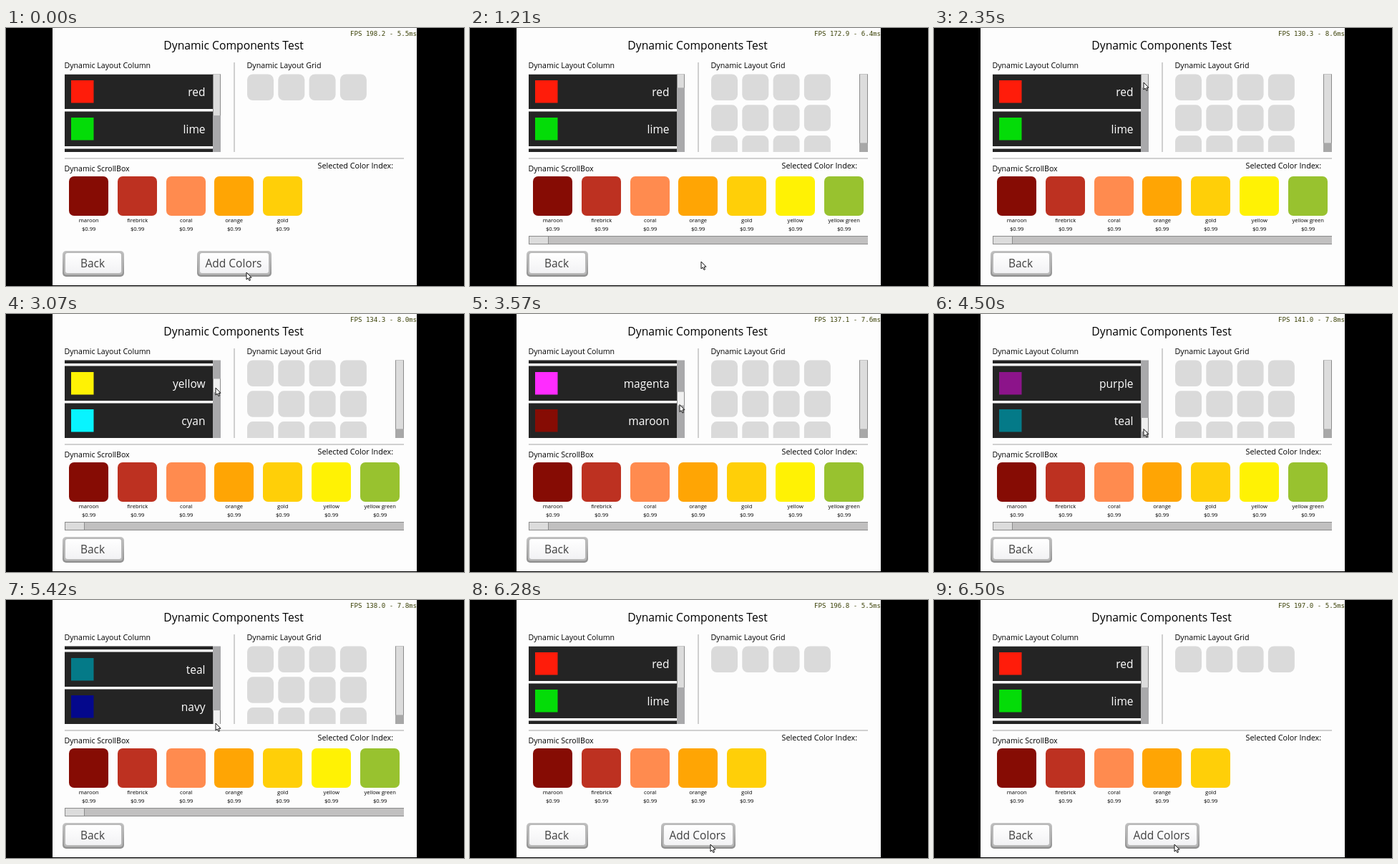
Animation of 640 by 360 pixels, one loop 6570 ms. Source, as an HTML page with a canvas:

```html
<!DOCTYPE html>
<html lang="en">
<head>
<meta charset="utf-8">
<title>Dynamic Components Test</title>
<style>
  html, body { margin: 0; width: 100%; height: 100%; overflow: hidden; background: #000; }
  canvas { display: block; width: 640px; height: 360px; }
</style>
</head>
<body>
<canvas id="stage" width="640" height="360"></canvas>
<script>
const ctx = document.getElementById('stage').getContext('2d');

const LOOP = 6570, ADD_AT = 860, RESET_AT = 6000;
const GRAB_Y = 81;                      // pointer height at which the drag begins
const VIEW = { top: 64.5, height: 108.5 };
const ROW = { pitch: 52, height: 48.5 };

const columnColors = [
  ['red', '#ff1c0a'], ['lime', '#04dc08'], ['blue', '#0818ff'], ['yellow', '#fff204'],
  ['cyan', '#08f4ff'], ['magenta', '#ff2cff'], ['maroon', '#860c04'], ['olive', '#868204'],
  ['green', '#048208'], ['purple', '#8c148a'], ['teal', '#047a88'], ['navy', '#04088c']
];
const boxColors = [
  ['maroon', '#860c04'], ['firebrick', '#bd3121'], ['coral', '#ff8b4f'], ['orange', '#ffa504'],
  ['gold', '#ffcf08'], ['yellow', '#fff204'], ['yellow green', '#98c22f']
];

// time, pointer x, pointer y
const pointerPath = [
  [0, 336, 341], [150, 336, 341], [600, 323, 326], [1480, 323, 326], [2050, 293, 74],
  [2350, 293, 76], [2600, 293, 81], [3570, 293, 126.5], [4500, 293, 160.5],
  [5100, 293, 172], [RESET_AT, 293, 172], [RESET_AT, 336, 341], [LOOP, 336, 341]
];
// time, frames per second, milliseconds
const speedPath = [
  [0, 198.2, 5.5], [ADD_AT, 196, 5.6], [1210, 172.9, 6.4], [2350, 130.3, 8.6],
  [3570, 137.1, 7.6], [4500, 141, 7.8], [5420, 138, 7.8], [RESET_AT, 139, 7.8],
  [RESET_AT, 196.5, 5.5], [6500, 197, 5.5], [LOOP, 197, 5.5]
];

function along(path, time) {
  const next = Math.max(1, path.findIndex(key => key[0] > time));
  const a = path[next - 1], b = path[next];
  const p = (time - a[0]) / (b[0] - a[0]);
  return [1, 2].map(i => a[i] + (b[i] - a[i]) * p);
}

function rect(x, y, w, h, fill) {
  ctx.fillStyle = fill;
  ctx.fillRect(x, y, w, h);
}

function rounded(x, y, w, h, r, fill) {
  ctx.fillStyle = fill;
  ctx.beginPath();
  ctx.roundRect(x, y, w, h, r);
  ctx.fill();
}

function text(str, x, y, size, align = 'left', fill = '#000', family = '"Open Sans", sans-serif') {
  ctx.font = `${size}px ${family}`;
  ctx.textAlign = align;
  ctx.fillStyle = fill;
  ctx.fillText(str, x, y);
}

function vertical(y, h, from, to) {
  const g = ctx.createLinearGradient(0, y, 0, y + h);
  g.addColorStop(0, from);
  g.addColorStop(1, to);
  return g;
}

function clipped(x, y, w, h, draw) {
  ctx.save();
  ctx.beginPath();
  ctx.rect(x, y, w, h);
  ctx.clip();
  draw();
  ctx.restore();
}

function thumb(x, y, w, h, fill = '#dcdcdc') {
  rect(x, y, w, h, '#8c8c8c');
  rect(x + 1, y, w - 2, h, fill);
}

function button(label, x, w) {
  rounded(x, 311, w, 36, 5, vertical(311, 36, '#c4c4c4', '#909090'));
  rounded(x + 2, 312.5, w - 4, 32, 4, '#b8b8b8');
  rounded(x + 4, 314, w - 8, 28, 3, vertical(314, 28, '#ffffff', '#f2f2f4'));
  text(label, x + w / 2 - 1, 334.3, 15.5, 'center', '#404040');
}

function column(count, pointerY, dragging) {
  const content = (count - 1) * ROW.pitch + ROW.height;
  const maxScroll = content - VIEW.height;
  const thumbHeight = VIEW.height ** 2 / content;
  const travel = VIEW.height - thumbHeight;
  const drag = dragging ? Math.max(0, Math.min(travel, pointerY - GRAB_Y)) : 0;

  // The list moves in whole rows, so that the lowest row shown is never cut.
  const rowsLeft = Math.round((1 - drag / travel) * maxScroll / ROW.pitch);
  const scroll = Math.max(0, maxScroll - rowsLeft * ROW.pitch);

  clipped(82, VIEW.top, 207, VIEW.height, () => {
    columnColors.slice(0, count).forEach(([name, color], i) => {
      const y = VIEW.top + i * ROW.pitch - (drag ? scroll : 0);
      rect(82, y, 207, ROW.height, '#242424');
      rect(91, y + 8.5, 31.5, 31.5, color);
      text(name, 278.5, y + 30, 15.5, 'right', '#fff');
    });
  });
  const offset = drag ? scroll / maxScroll * travel : 0;
  rect(289, VIEW.top, 11, VIEW.height, '#a9a9ab');
  thumb(289, VIEW.top + offset, 11, thumbHeight, dragging ? '#f0f0f0' : '#dcdcdc');
}

function grid(count, scrollable) {
  clipped(336, 64, 170, 109, () => {
    for (let i = 0; i < count; i++) {
      rounded(337 + i % 4 * 43.3, 64.5 + Math.floor(i / 4) * 42.8, 37, 36.5, 8, '#dadada');
    }
  });
  if (scrollable) {
    rect(544, VIEW.top, 12, VIEW.height, '#a8a8a8');
    thumb(544, VIEW.top, 12, 96);
  }
}

function scrollBox(count, scrollable) {
  boxColors.slice(0, count).forEach(([name, color], i) => {
    const x = Math.round(88 + i * 67.8);
    rounded(x, 207, 55, 55, 7, color);
    text(name, x + 27.7, 271, 7.6, 'center');
    text('$0.99', x + 27.7, 283, 7.7, 'center');
  });
  if (scrollable) {
    rect(82, 290, 474, 12, '#8c8c8c');
    rect(82, 291, 474, 10, '#c1c0c0');
    thumb(82, 291, 28, 10);
  }
}

function pointer(x, y) {
  ctx.save();
  ctx.translate(x, y);
  ctx.beginPath();
  [[0, 0], [0, 10], [2.2, 8], [4, 11.5], [5.5, 10.8], [4, 7.3], [7, 7.2]]
    .forEach(point => ctx.lineTo(...point));
  ctx.closePath();
  ctx.fillStyle = '#fff';
  ctx.fill();
  ctx.lineWidth = 1;
  ctx.strokeStyle = '#111';
  ctx.stroke();
  ctx.restore();
}

function draw(time) {
  const full = time >= ADD_AT && time < RESET_AT;
  const [x, y] = along(pointerPath, time);
  const [fps, ms] = along(speedPath, time);

  rect(0, 0, 640, 360, '#000');
  rect(65, 0, 509, 359, '#fdfdfd');
  clipped(65, 0, 509, 359, () => {
    text(`FPS ${fps.toFixed(1)} - ${ms.toFixed(1)}ms`, 481, 10.5, 9.1, 'left',
      '#3c4208', '"DejaVu Sans Mono", monospace');
  });

  text('Dynamic Components Test', 318, 30, 15.7, 'center');
  text('Dynamic Layout Column', 81.5, 55.5, 10.6);
  text('Dynamic Layout Grid', 336.5, 55.5, 10.7);
  text('Dynamic ScrollBox', 81.5, 199.5, 10.6);
  text('Selected Color Index:', 435.5, 196, 10.8);
  rect(318, 48, 2, 125, '#d0d0d0');
  rect(82, 181, 474, 2, '#d0d0d0');

  column(full ? 12 : 4, y, full && time > 2400);
  grid(full ? 12 : 4, full);
  scrollBox(full ? 7 : 5, full);
  button('Back', 79, 86);
  if (!full) button('Add Colors', 267, 104);
  pointer(x, y);
}

const start = performance.now();
function tick() {
  draw((performance.now() - start) % LOOP);
  requestAnimationFrame(tick);
}
tick();
</script>
</body>
</html>
```
